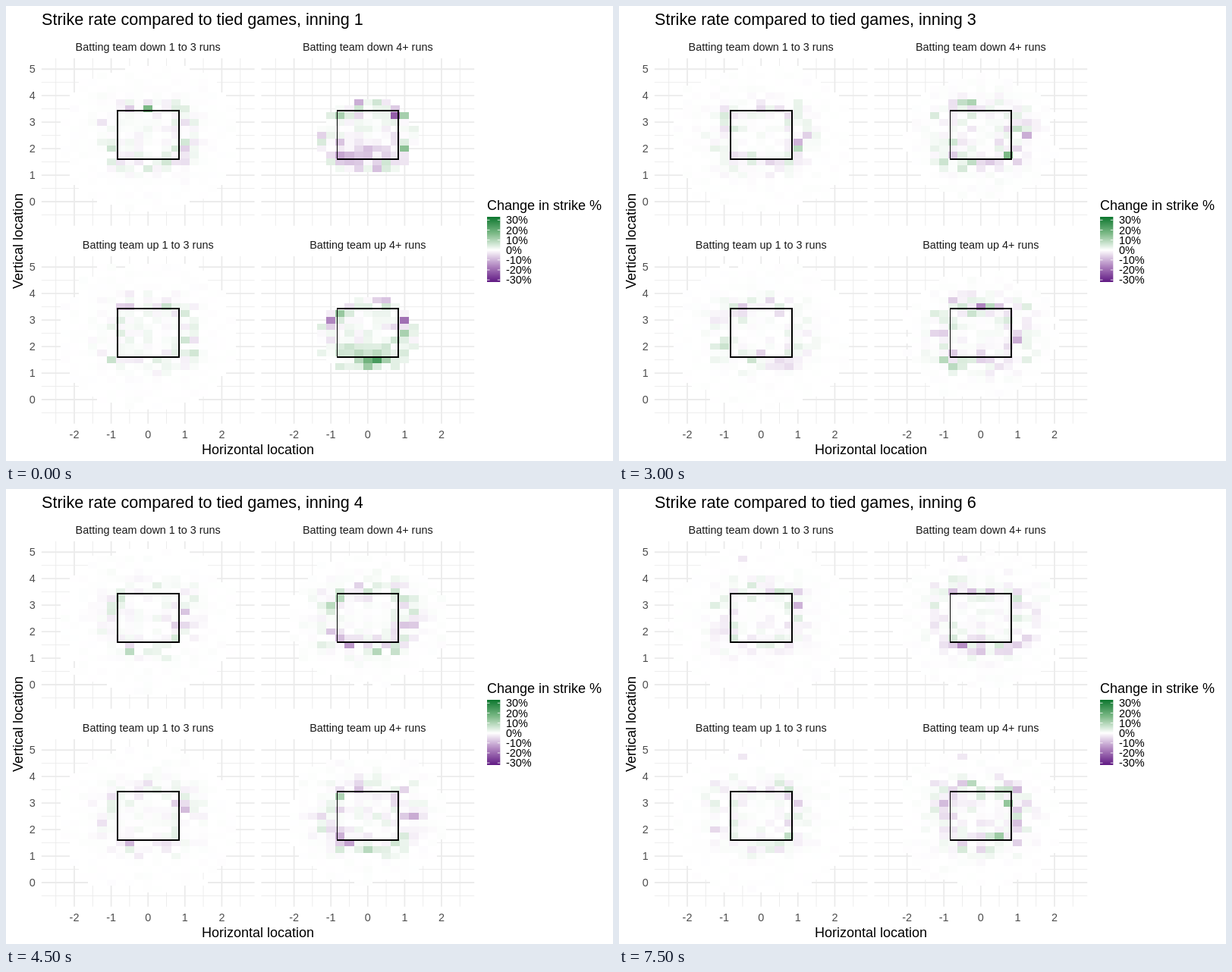
These frames come from a looping animation (800x600 px, 8 s). An HTML page:

```html
<!DOCTYPE html>
<html lang="en">
<head>
<meta charset="utf-8">
<title>Strike rate by inning</title>
<style>
  html, body { margin: 0; width: 100%; height: 100%; overflow: hidden; background: #fff; }
  svg { display: block; width: 800px; height: 600px; font-family: "Liberation Sans", Arial, sans-serif; }
  .cells, .zone { shape-rendering: crispEdges; }
  .zone { fill: none; stroke: #000; stroke-width: 2; }
  .inning { visibility: hidden; animation: show 8s step-end infinite; }
  .inning:last-child { animation-name: show-last; }
  @keyframes show { 0% { visibility: visible; } 18.75%, 100% { visibility: hidden; } }
  @keyframes show-last { 0% { visibility: visible; } 6.25%, 100% { visibility: hidden; } }
</style>
</head>
<body>
<svg id="chart" viewBox="0 0 800 600"></svg>
<script>
const UNIT_X = 48.6, UNIT_Y = 34.95, STEP = 0.25;
const INNINGS = 6, HOLD = 1.5, LOOP = 8;

const panels = [
  { key: 'down3', label: 'Batting team down 1 to 3 runs', x0: 187.2, top: 69 },
  { key: 'down4', label: 'Batting team down 4+ runs', x0: 476.8, top: 69, bigLead: true },
  { key: 'up3', label: 'Batting team up 1 to 3 runs', x0: 187.2, top: 330 },
  { key: 'up4', label: 'Batting team up 4+ runs', x0: 476.8, top: 330, bigLead: true }
];

// The few cells that stand out; without a key they belong to all panels
const peaks = [
  { inning: 1, key: 'down3', x: 0, y: 3.5, percent: 17 },
  { inning: 1, key: 'down4', x: .75, y: 3.25, percent: -22 },
  { inning: 1, key: 'down4', x: 1, y: 2, percent: 15 },
  { inning: 1, key: 'up4', x: -1, y: 3, percent: -16 },
  { inning: 3, key: 'up4', x: 0, y: 3.5, percent: -16 },
  { inning: 5, key: 'up4', x: .75, y: 2.25, percent: -14 },
  { inning: 5, x: -1.5, y: 4.5, percent: -4 },
  { inning: 6, x: -.5, y: 4.75, percent: -3 }
];

const WHITE = [255, 255, 255];
const GREENS = [WHITE, [126, 186, 136], [15, 120, 48]];
const PURPLES = [WHITE, [174, 130, 190], [92, 20, 128]];

function fillFor(percent) {
  const stops = percent < 0 ? PURPLES : GREENS;
  const t = Math.min(Math.abs(percent) / 33, 1) * 2;
  const i = t < 1 ? 0 : 1;
  return `rgb(${stops[i].map((c, k) => Math.round(c + (stops[i + 1][k] - c) * (t - i)))})`;
}

function random(...seeds) {
  let h = 2166136261;
  for (const s of seeds) {
    h = Math.imul(h ^ (s + 101), 16777619);
    h ^= h >>> 13;
  }
  h = Math.imul(h ^ (h >>> 15), 2246822507);
  return ((h ^ (h >>> 13)) >>> 0) / 4294967296;
}

const bell = (...seeds) => (random(...seeds, 1) + random(...seeds, 2) + random(...seeds, 3) - 1.5) * 2;
const hump = (v, width) => Math.exp(-((v / width) ** 2));

const toX = (p, x) => p.x0 + x * UNIT_X;
const toY = (p, y) => p.top + 189 - y * UNIT_Y;

const rect = (x, y, w, h, fill) =>
  `<rect x="${x.toFixed(2)}" y="${y.toFixed(2)}" width="${w.toFixed(2)}" height="${h.toFixed(2)}" fill="${fill}"/>`;
const line = (x1, y1, x2, y2, width, color = '#ebebeb') =>
  `<path d="M${x1} ${y1}L${x2} ${y2}" stroke="${color}" stroke-width="${width}"/>`;
const text = (x, y, size, color, anchor, str, extra = '') =>
  `<text x="${x}" y="${y}" font-size="${size}" fill="${color}" text-anchor="${anchor}" ${extra}>${str}</text>`;

function cell(p, x, y, percent) {
  const w = UNIT_X * STEP, h = UNIT_Y * STEP;
  return rect(toX(p, x) - w / 2, toY(p, y) - h / 2, w, h, fillFor(percent));
}

// Changes concentrate along the edge of the strike zone
function edgeWeight(x, y) {
  const r = Math.hypot(Math.abs(x / 1.02) ** 1.5, Math.abs((y - 2.5) / 1.08) ** 1.5) ** (2 / 3);
  return r < 1 ? .2 + .8 * hump(r - 1, .3) : .04 + .96 * hump(r - 1, .36);
}

function panelCells(p, index, inning) {
  // Big leads are rare early on: few pitches, so a small area and strong swings
  const rarity = p.bigLead ? 1 / inning : 0;
  const rx = 2.35 - 1.05 * rarity;
  const ry = 2.7 - 1.35 * rarity;
  const strength = p.bigLead ? 3.8 + 1.2 * rarity : 2.7;
  const lean = (p.key === 'down4' ? -9 : 7) * rarity ** 3;
  let out = '';
  for (let i = -11; i <= 11; i++) {
    for (let j = -3; j <= 21; j++) {
      const x = i * STEP, y = j * STEP;
      const r = Math.abs(x / rx) ** 2.3 + Math.abs((y - 2.4) / ry) ** 2.3;
      if (r > .94 + .22 * random(inning, index, i, j, 7)) continue;
      const noise = .6 * bell(inning, 9, i, j) + .75 * bell(inning, index, i, j);
      const swing = strength * noise * (.7 + .35 * Math.abs(noise));
      out += cell(p, x, y, edgeWeight(x, y) * swing + lean * hump(y - 1.75, .38) * hump(x, 1.25));
    }
  }
  return out + peaks
    .filter(c => c.inning === inning && (!c.key || c.key === p.key))
    .map(c => cell(p, c.x, c.y, c.percent)).join('');
}

function grid(p) {
  const left = p.x0 - 140.4, right = p.x0 + 140.4, bottom = p.top + 220.8;
  let minor = '', major = '';
  for (let v = -2.5; v <= 2.5; v++) minor += line(toX(p, v), p.top, toX(p, v), bottom, .9);
  for (let v = -.5; v < 5; v++) minor += line(left, toY(p, v), right, toY(p, v), .9);
  for (let v = -2; v <= 2; v++) major += line(toX(p, v), p.top, toX(p, v), bottom, 1.8);
  for (let v = 0; v <= 5; v++) major += line(left, toY(p, v), right, toY(p, v), 1.8);
  return minor + major;
}

function zone(p) {
  const y = p.top + 69;
  return p.bigLead
    ? `<path class="zone" d="M436 ${y}H517V${y + 64}H436"/>${line(436.5, y, 436.5, y + 64, 1, '#000')}`
    : `<rect class="zone" x="147" y="${y}" width="81" height="64"/>`;
}

function labels() {
  let out = '';
  for (const p of panels) {
    out += text(p.x0, p.top - 9.7, 14.4, '#1a1a1a', 'middle', p.label);
    if (!p.bigLead) for (let v = 0; v <= 5; v++) out += text(38.8, toY(p, v) + 5.2, 14.4, '#4d4d4d', 'end', v);
    if (p.top > 100) for (let v = -2; v <= 2; v++) out += text(toX(p, v), 570, 14.4, '#4d4d4d', 'middle', v);
  }
  return out + text(332, 591, 18, '#000', 'middle', 'Horizontal location')
    + text(0, 0, 18, '#000', 'middle', 'Vertical location', 'transform="translate(21.5 310) rotate(-90)"');
}

function legend() {
  let out = text(634, 269, 18, '#000', 'start', 'Change in strike %');
  for (let y = 278; y < 364; y++) out += rect(634, y, 17.3, 1, fillFor((321.3 - y) / 1.31));
  for (let v = 30; v >= -30; v -= 10) {
    const y = 321.7 - v * 1.315;
    out += line(634, y, 637.5, y, .8, '#fff') + line(647.8, y, 651.3, y, .8, '#fff');
    out += text(659, y + 5.2, 14.4, '#000', 'start', v + '%');
  }
  return out;
}

function inningGroup(inning) {
  const delay = inning > 1 ? (inning - 1) * HOLD - LOOP : 0;
  return `<g class="inning" style="animation-delay:${delay}s">`
    + text(47, 25.3, 21.6, '#000', 'start', `Strike rate compared to tied games, inning ${inning}`)
    + `<g class="cells">${panels.map((p, i) => panelCells(p, i, inning)).join('')}</g>`
    + panels.map(zone).join('') + '</g>';
}

document.getElementById('chart').innerHTML =
  panels.map(grid).join('') + labels() + legend()
  + Array.from({ length: INNINGS }, (_, n) => inningGroup(n + 1)).join('');
</script>
</body>
</html>
```
